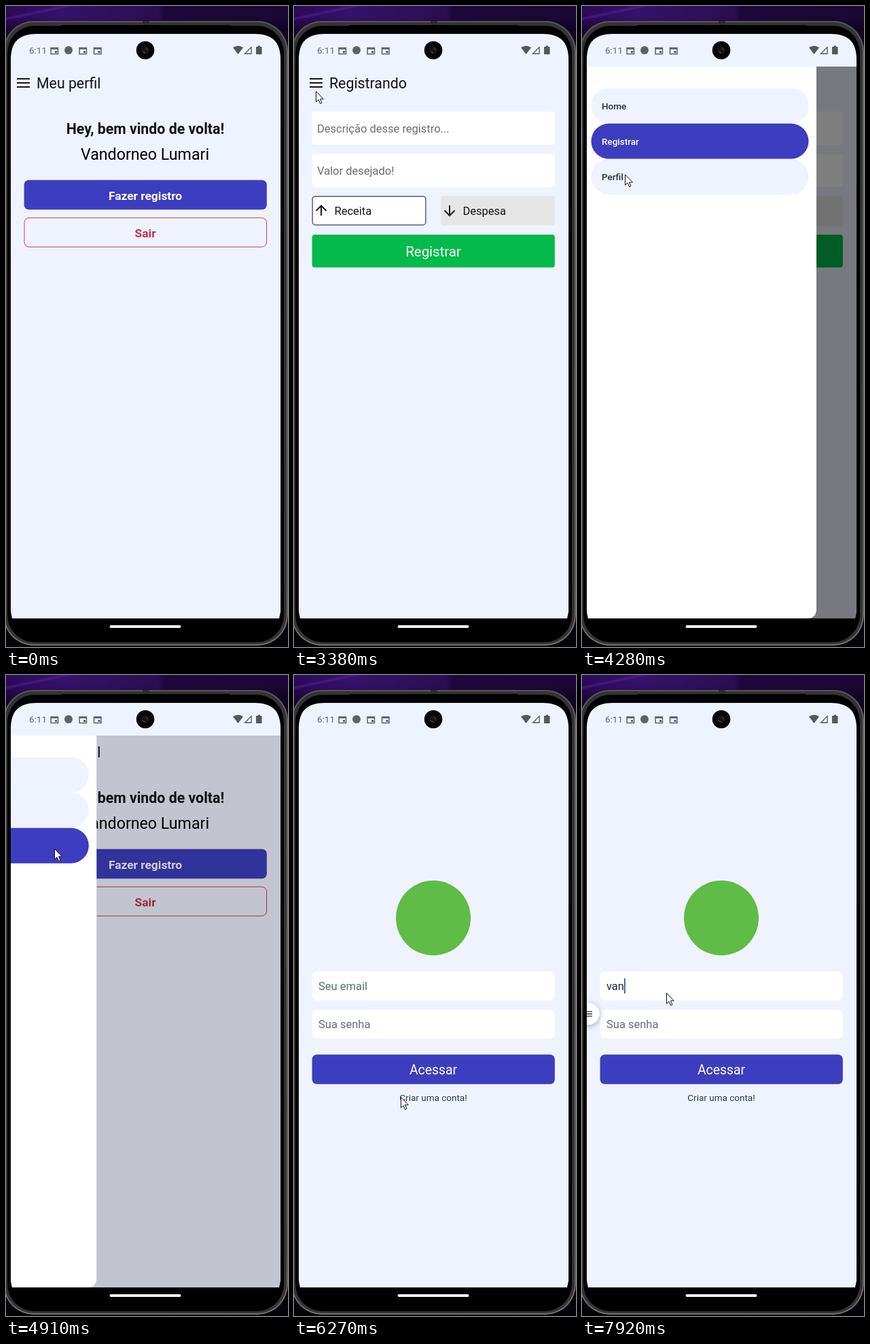
Recreate the animation shown at these times as an HTML page. Size 415x942 px, loop 7.99 s.

```html
<!DOCTYPE html>
<html lang="pt-BR">
<head>
<meta charset="utf-8">
<title>App demo</title>
<style>
html, body { margin: 0; width: 100%; height: 100%; overflow: hidden; background: #050208; }
svg { display: block; width: 415px; height: 942px; font-family: Roboto, sans-serif; }
.bold { font-weight: 700; }
.medium { font-weight: 500; }
.mid { text-anchor: middle; }
.title { font-size: 21.3px; fill: #111118; }
.field { font-size: 16.5px; }
.hint { fill: #6c6c74; }
.mail { fill: #5c7070; }
.item { font-size: 13.5px; }
.line { fill: none; stroke: #17171c; stroke-width: 2; }
</style>
</head>
<body>
<svg viewBox="0 0 415 942">
  <defs>
    <linearGradient id="sky">
      <stop offset="0" stop-color="#2a0a58"/>
      <stop offset=".2" stop-color="#35126a"/>
      <stop offset=".54" stop-color="#2a0e52"/>
      <stop offset=".56" stop-color="#1e083c"/>
      <stop offset="1" stop-color="#1a0733"/>
    </linearGradient>
    <linearGradient id="shade" x2="0" y2="1">
      <stop offset="0" stop-color="#08020f" stop-opacity="0"/>
      <stop offset="1" stop-color="#08020f"/>
    </linearGradient>
    <linearGradient id="rim" x2="0" y2="1">
      <stop offset="0" stop-color="#555"/>
      <stop offset=".06" stop-color="#686868"/>
      <stop offset=".9" stop-color="#5c5c5c"/>
      <stop offset="1" stop-color="#707070"/>
    </linearGradient>
    <clipPath id="screen">
      <path d="M7 79C7 52 20 41 45 41H366C391 41 404 52 404 79V890L402 900H9L7 890Z"/>
    </clipPath>
    <clipPath id="body"><rect x="7" y="89" width="397" height="811"/></clipPath>
    <filter id="soft" x="-80%" y="-80%" width="260%" height="260%">
      <feDropShadow dx="0" dy="2" stdDeviation="5" flood-opacity=".32"/>
    </filter>
    <g id="event" fill="none" stroke="#5f6167" stroke-width="1.5">
      <path d="M1 2.5H11.5V11.5H1ZM1 4H11.5"/>
      <path d="M7 8.5H10" stroke-width="3"/>
    </g>
    <path id="menu" class="line" d="M0 1H19M0 7H19M0 13H19"/>
  </defs>

  <!-- wallpaper and phone -->
  <rect width="415" height="942" fill="#050208"/>
  <rect width="415" height="60" fill="url(#sky)"/>
  <path d="M0 17L80 0H100L0 21Z" fill="#6525a5" opacity=".4"/>
  <rect y="16" width="415" height="40" fill="url(#shade)"/>
  <rect x="-4" y="22" width="419" height="918" rx="45" fill="url(#rim)"/>
  <rect x="-2" y="24" width="415" height="914" rx="43" fill="#343434"/>
  <rect x="2" y="29" width="407" height="906" rx="40" fill="#000"/>
  <path d="M82 29.5H330" stroke="#000" stroke-width="3"/>
  <rect x="201" y="22" width="10" height="6" fill="#2d2d2d"/>
  <rect x="152.5" y="910" width="105" height="4" rx="2" fill="#f4f4f4"/>

  <g clip-path="url(#screen)">
    <rect x="7" y="41" width="397" height="859" fill="#eff3ff"/>

    <g id="profile">
      <use href="#menu" x="16" y="106"/>
      <text class="title" x="45" y="121">Meu perfil</text>
      <text class="title bold mid" x="205" y="187.5">Hey, bem vindo de volta!</text>
      <text class="mid" x="204.5" y="226" font-size="23.2">Vandorneo Lumari</text>
      <rect x="26.6" y="255.7" width="357.2" height="43.5" rx="7" fill="#3d3dbf"/>
      <text class="bold mid" x="205" y="284.5" font-size="17.4" fill="#fff">Fazer registro</text>
      <rect x="27" y="311.3" width="356.5" height="42.8" rx="7" fill="none" stroke="#cb3d55"/>
      <text class="bold mid" x="205" y="339.5" font-size="17.4" fill="#c8304a">Sair</text>
    </g>

    <g id="register">
      <use href="#menu" x="23" y="106"/>
      <text class="title" x="52" y="121">Registrando</text>
      <rect x="26.6" y="155.3" width="357.2" height="48.7" rx="4" fill="#fff"/>
      <text class="field hint" x="34" y="186">Descrição desse registro...</text>
      <rect x="26.6" y="217.3" width="357.2" height="48.7" rx="4" fill="#fff"/>
      <text class="field hint" x="34" y="248">Valor desejado!</text>
      <rect x="27.2" y="279.7" width="166.6" height="42" rx="4" fill="#fff" stroke="#5b5b92" stroke-width="1.5"/>
      <path class="line" d="M40 308V294M32.5 301L40 293.5 47.5 301"/>
      <text class="field" x="59.5" y="307" fill="#15151a">Receita</text>
      <rect x="216" y="279" width="167.8" height="43.5" rx="4" fill="#e6e6e6"/>
      <path class="line" d="M229 293V307M221.5 300.5L229 308 236.5 300.5"/>
      <text class="field" x="248.5" y="307" fill="#15151a">Despesa</text>
      <rect x="26.6" y="336" width="357.2" height="48.2" rx="4" fill="#04ba4b"/>
      <text class="mid" x="205" y="368" font-size="20.4" fill="#fff">Registrar</text>
    </g>

    <g id="login">
      <circle cx="205" cy="357" r="55" fill="#5fbc46"/>
      <rect x="26.6" y="435.8" width="357.2" height="42.4" rx="7" fill="#fff"/>
      <text id="email" class="field" x="36" y="463"></text>
      <rect id="caret" y="446" width="1.8" height="22" fill="#2c6687"/>
      <rect x="26.6" y="491.8" width="357.2" height="42.4" rx="7" fill="#fff"/>
      <text class="field mail" x="36" y="519">Sua senha</text>
      <rect x="26.6" y="557.8" width="357.2" height="43.5" rx="7" fill="#3d3dbf"/>
      <text class="mid" x="205" y="587" font-size="19.4" fill="#fff">Acessar</text>
      <text class="mid item" x="205" y="625.5" fill="#263c40">Criar uma conta!</text>
      <g id="bubble">
        <circle cx="9.5" cy="498" r="16" fill="#fff" filter="url(#soft)"/>
        <path d="M5.5 494.7H15M5.5 498H15M5.5 501.3H15" stroke="#333" stroke-width="1.3"/>
      </g>
    </g>

    <g clip-path="url(#body)">
      <rect id="dim" x="7" y="89" width="397" height="811"/>
      <g id="drawer">
        <path d="M7 89H345V886Q345 900 331 900H7Z" fill="#fff"/>
        <g id="items"></g>
      </g>
    </g>

    <!-- status bar -->
    <text x="34" y="70" font-size="13.5" fill="#5f6167">6:11</text>
    <use href="#event" x="65" y="59"/>
    <circle cx="92" cy="65" r="6" fill="#5f6167"/>
    <use href="#event" x="107" y="59"/>
    <use href="#event" x="128.5" y="59"/>
    <path d="M334 61Q341.5 56 349 61L341.5 71Z" fill="#55575c"/>
    <path d="M351.5 70H361V60.5Z" fill="none" stroke="#55575c" stroke-width="1.3"/>
    <path d="M368 60H370.5V58.5H374V60H376.5V71H368Z" fill="#55575c"/>
    <circle cx="205" cy="65" r="13.3" fill="#050505"/>
    <circle cx="205" cy="65" r="5.5" fill="#161616"/>
    <path d="M201 66Q202 69 205 69M206 62Q208 62 208.5 65" fill="none" stroke="#555"/>
  </g>

  <g id="pointer">
    <circle id="press" r="12.3" fill="#f0e63c" opacity=".6"/>
    <path d="M.5 .5V16L4 12.7 6.6 18.5 9 17.4 6.4 11.8H11.3Z" fill="#fff" stroke="#111"/>
  </g>
</svg>
<script>
const LOOP = 7990;
const OPEN = [4000, 4250], CLOSE = [4770, 5011];
const DRAWER = 338;
const pages = [[0, 'profile'], [2170, 'register'], [4770, 'profile'], [5900, 'login']];
const presses = [[1990, 2130], [3660, 3840], [4630, 4760], [5720, 5860], [6860, 6990]];
const typed = [[7360, 'v'], [7570, 'va'], [7850, 'van']];
const FOCUS = 6990;

// time, x, y of the pointer tip
const path = [
  [190, 378, 913], [420, 300, 560], [700, 150, 230], [950, 72, 166],
  [1150, 61, 144], [1400, 96, 180], [1780, 173, 275], [1950, 185, 286],
  [2100, 185, 286], [2270, 186, 295], [2600, 186, 295], [3380, 32, 125],
  [3600, 32, 125], [3660, 34, 116], [4000, 34, 116], [4280, 63, 247],
  [4480, 71, 255], [4910, 71, 255], [5590, 183, 328], [5860, 183, 328],
  [6130, 173, 546], [6270, 157, 620], [6400, 155, 580], [6470, 155, 580],
  [6860, 124, 467], [LOOP, 124, 467]
];

const $ = id => document.getElementById(id);
const show = (el, on) => el.setAttribute('visibility', on ? 'visible' : 'hidden');
const last = (steps, t) => steps.filter(s => t >= s[0]).pop();
const inside = ([a, b], t) => t >= a && t < b;

function ease(t, [a, b]) {
  const p = Math.min(1, Math.max(0, (t - a) / (b - a)));
  return p * p * (3 - 2 * p);
}

// Smooth speed through passing points, none at rests.
function slope(i, k) {
  const a = path[i - 1], p = path[i], b = path[i + 1];
  if (!a || !b) return 0;
  const before = p[k] - a[k], after = b[k] - p[k];
  return before * after <= 0 ? 0 : (before + after) / (b[0] - a[0]);
}

function tip(t, k) {
  let i = 0;
  while (i < path.length - 2 && t >= path[i + 1][0]) i++;
  const a = path[i], b = path[i + 1], d = b[0] - a[0];
  const u = Math.max(0, (t - a[0]) / d), v = 1 - u;
  return v * v * (1 + 2 * u) * a[k] + u * u * (3 - 2 * u) * b[k]
    + u * v * d * (v * slope(i, k) - u * slope(i + 1, k));
}

$('items').innerHTML = ['Home', 'Registrar', 'Perfil'].map((label, i) => {
  const y = 120.7 + 52 * i;
  return `<rect x="13.5" y="${y}" width="320" height="52" rx="26"/>
    <text class="item medium" x="29" y="${y + 31.3}">${label}</text>`;
}).join('');
const pills = $('items').querySelectorAll('rect');
const labels = $('items').querySelectorAll('text');

function drawDrawer(t, page) {
  const open = ease(t, OPEN) - ease(t, CLOSE);
  $('drawer').setAttribute('transform', `translate(${(open - 1) * DRAWER})`);
  show($('drawer'), open > 0);
  $('dim').setAttribute('opacity', open / 2);
  const active = page === 'register' ? 1 : 2;
  pills.forEach((pill, i) => {
    pill.setAttribute('fill', i === active ? '#3d3dbf' : '#eff2ff');
    labels[i].setAttribute('fill', i === active ? '#fff' : '#25303c');
  });
}

function drawLogin(t, visible) {
  const entry = last(typed, t), email = $('email');
  email.textContent = entry ? entry[1] : 'Seu email';
  email.setAttribute('fill', entry ? '#1c2450' : '#5c7070');
  const width = entry ? email.getComputedTextLength() : 0;
  $('caret').setAttribute('x', 36 + width);
  show($('caret'), visible && t >= FOCUS);
  const slide = ease(t, [7430, 7710]);
  $('bubble').setAttribute('transform', `translate(${(slide - 1) * 45})`);
}

function draw(t) {
  const page = last(pages, t)[1];
  for (const id of ['profile', 'register', 'login']) show($(id), id === page);
  drawDrawer(t, page);
  drawLogin(t, page === 'login');
  const on = t >= path[0][0];
  show($('pointer'), on);
  $('pointer').setAttribute('transform', `translate(${tip(t, 1)} ${tip(t, 2)})`);
  show($('press'), on && presses.some(span => inside(span, t)));
}

const start = performance.now();
function tick() {
  draw((performance.now() - start) % LOOP);
  requestAnimationFrame(tick);
}
tick();
</script>
</body>
</html>
```
